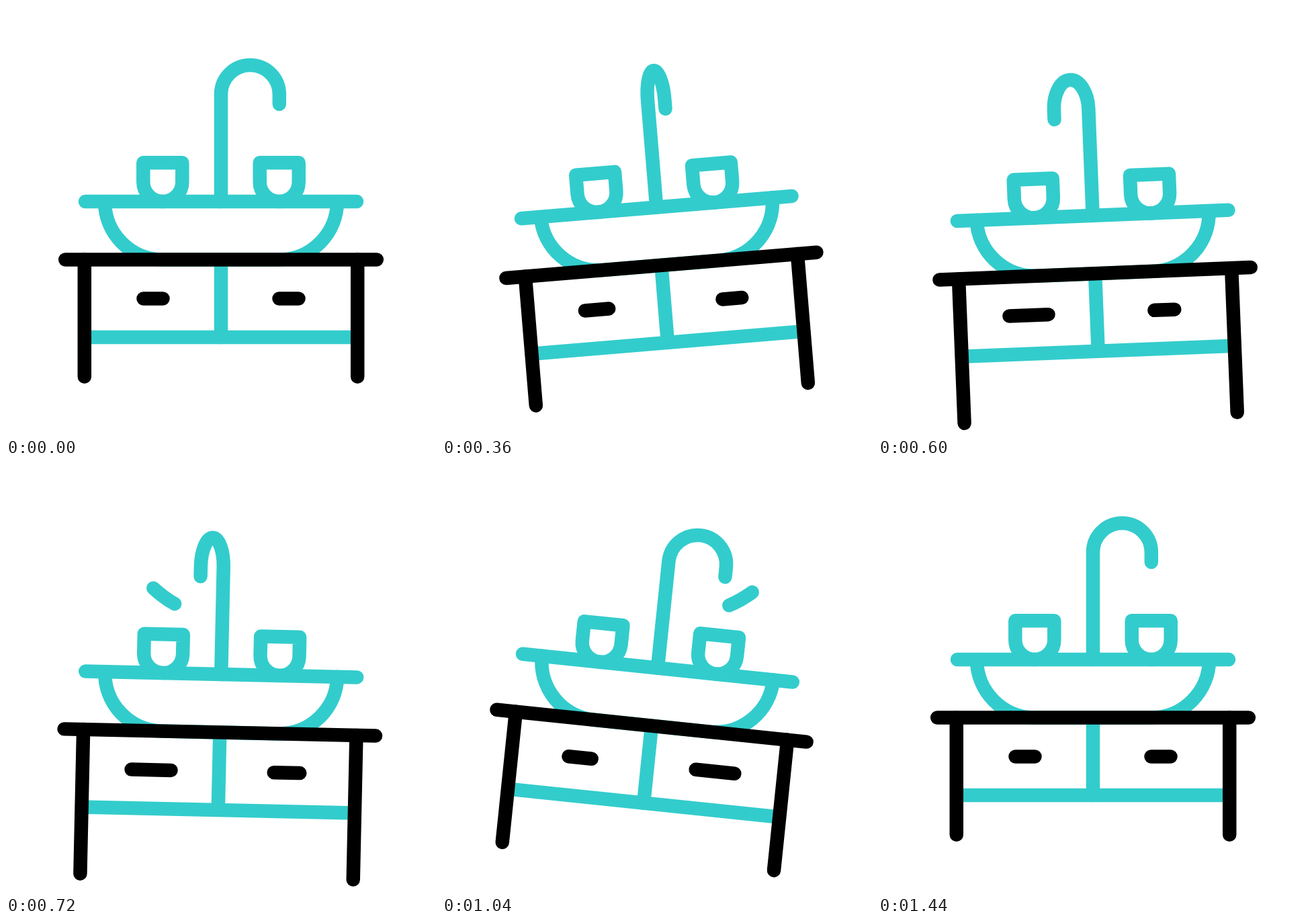
These frames come from a looping animation (640 by 640 pixels, 1.52 s). An HTML page with a canvas:

```html
<!DOCTYPE html>
<html lang="en">
<head>
<meta charset="utf-8">
<title>Wash basin</title>
<style>
  html, body { margin: 0; width: 100%; height: 100%; overflow: hidden; background: #fff; }
  canvas { display: block; }
</style>
</head>
<body>
<canvas id="stage" width="640" height="640"></canvas>
<script>
const ctx = document.getElementById('stage').getContext('2d');
const LOOP = 1520, STEP = 40;
const TEAL = '#33cccc', BLACK = '#000';

// Keys are [time in ms, value]; every segment eases in and out.
const tracks = {
  tilt: [[80, 0], [405, -5], [425, -5], [965, 6], [1010, 6], [1440, 0]],
  drop: [[126, 0], [675, 22], [760, 22], [1380, 0]],
  legs: [[163, 0], [580, 40.5], [796, 40.5], [1298, 0]],
  spout: [[137, 1], [620, -0.6], [1060, 1]],
  leftPull: [[240, 0], [640, 15], [720, 15], [1160, 0]],
  rightPull: [[550, 0], [1000, 15], [1370, 0]],
  swooshHead: [[640, 0], [960, 1]],
  swooshTail: [[800, 0], [1120, 1]]
};

function valueAt(keys, t) {
  const next = keys.findIndex(key => key[0] > t);
  if (next === 0) return keys[0][1];
  if (next < 0) return keys[keys.length - 1][1];
  const [t0, a] = keys[next - 1], [t1, b] = keys[next];
  const u = (t - t0) / (t1 - t0);
  return a + (b - a) * u * u * (3 - 2 * u);
}

function stroke(color, trace) {
  ctx.strokeStyle = color;
  ctx.beginPath();
  trace();
  ctx.stroke();
}

function line(color, x1, y1, x2, y2) {
  stroke(color, () => { ctx.moveTo(x1, y1); ctx.lineTo(x2, y2); });
}

function cup(x) {
  stroke(TEAL, () => {
    ctx.moveTo(x - 29, 233.3);
    ctx.lineTo(x + 29, 233.3);
    ctx.lineTo(x + 29, 262);
    ctx.arc(x, 262, 29, 0, Math.PI);
    ctx.closePath();
  });
}

function tap(scale) {
  const x = f => 320 + 86.8 * f * scale;
  const k = 0.2239;
  stroke(TEAL, () => {
    ctx.moveTo(320, 291);
    ctx.lineTo(320, 131.5);
    ctx.bezierCurveTo(320, 107.5, x(k), 88, x(0.5), 88);
    ctx.bezierCurveTo(x(1 - k), 88, x(1), 107.5, x(1), 131.5);
    ctx.lineTo(x(1), 146);
  });
}

function swoosh(tail, head) {
  if (head <= tail) return;
  const angle = f => (131.7 - 83.7 * f) * Math.PI / 180;
  stroke(TEAL, () => ctx.arc(332, 35, 174, angle(tail), angle(head), true));
}

function basin() {
  line(TEAL, 118, 291, 522, 291);
  stroke(TEAL, () => {
    ctx.moveTo(147, 291);
    ctx.arc(233.5, 291, 86.5, Math.PI, Math.PI / 2, true);
    ctx.lineTo(406.5, 377.5);
    ctx.arc(406.5, 291, 86.5, Math.PI / 2, 0, true);
  });
}

function drawer(x, pull) {
  line(BLACK, x - 14.5 - pull, 435.5, x + 14.5 + pull, 435.5);
}

function draw(t) {
  const pose = {};
  for (const name in tracks) pose[name] = valueAt(tracks[name], t);

  ctx.setTransform(1, 0, 0, 1, 0, 0);
  ctx.fillStyle = '#fff';
  ctx.fillRect(0, 0, 640, 640);
  ctx.translate(320, 300 + pose.drop);
  ctx.rotate(pose.tilt * Math.PI / 180);
  ctx.translate(-320, -300);
  ctx.lineWidth = 20.5;
  ctx.lineCap = ctx.lineJoin = 'round';

  swoosh(pose.swooshTail, pose.swooshHead);
  tap(pose.spout);
  cup(233.3);
  cup(406.7);
  basin();
  line(TEAL, 320, 377.5, 320, 493);
  line(TEAL, 117, 493, 523, 493);

  line(BLACK, 88.2, 377.5, 551.8, 377.5);
  for (const x of [116.8, 523.2]) line(BLACK, x, 377.5, x, 551.7 + pose.legs);
  drawer(219, pose.leftPull);
  drawer(421, pose.rightPull);
}

const start = performance.now();
function tick() {
  const t = (performance.now() - start) % LOOP;
  draw(Math.floor(t / STEP) * STEP);
  requestAnimationFrame(tick);
}
tick();
</script>
</body>
</html>
```
